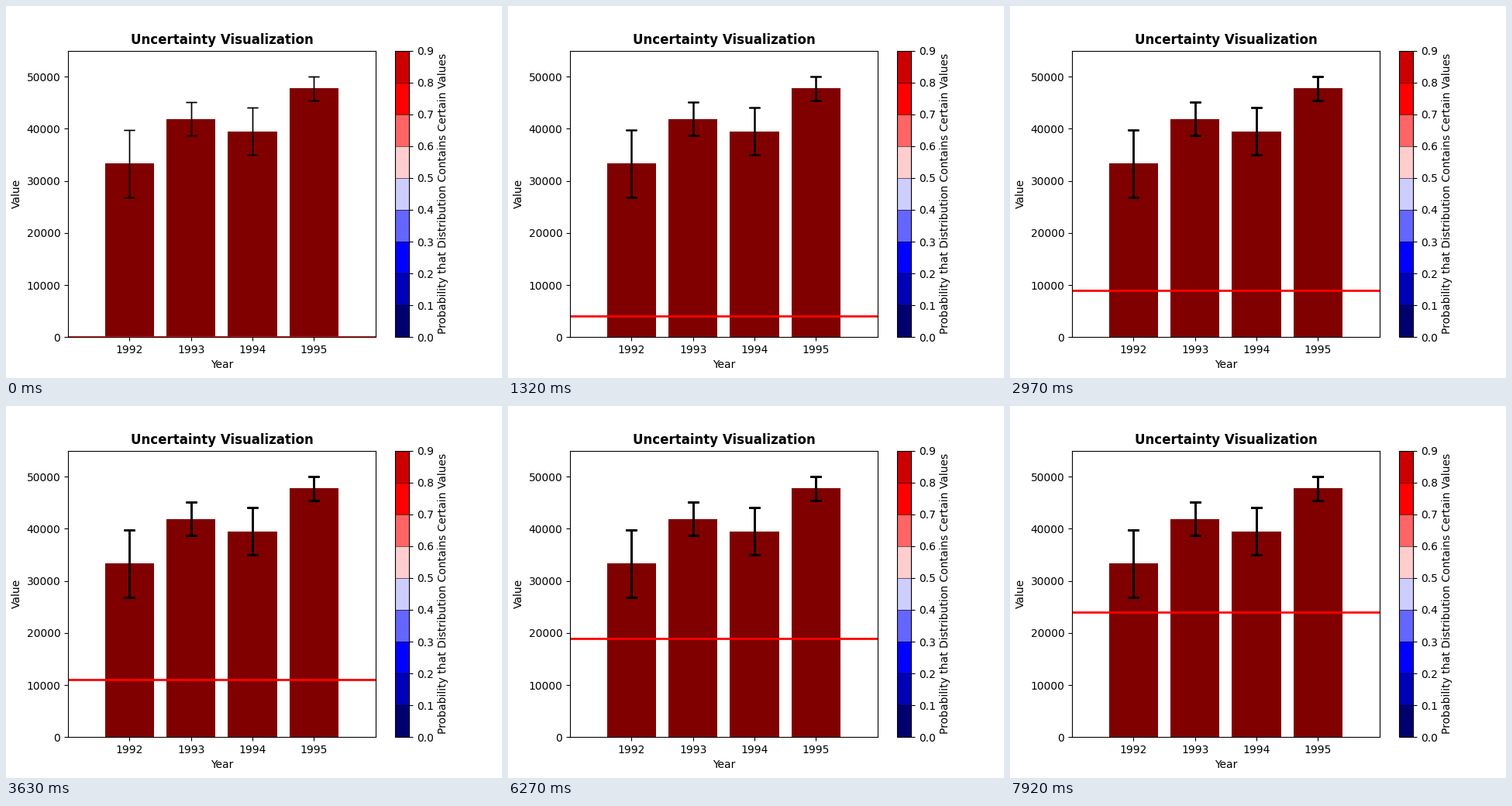
Animation, 640 px wide and 480 px high, one loop 8 s. Source, as a matplotlib script:

```python
import numpy as np
import matplotlib.pyplot as plt
from matplotlib.animation import FuncAnimation
from matplotlib.cm import ScalarMappable
from matplotlib.colors import BoundaryNorm, ListedColormap

LOOP_MS = 8000
TICK_MS = 40      # time between drawn frames
STEP_MS = 330     # time the threshold rests on each value
STEP_VALUE = 1000

years = ["1992", "1993", "1994", "1995"]
means = [33312, 41862, 39493, 47744]
errors = [6509, 3192, 4554, 2264]
seismic = plt.get_cmap("seismic")

plt.rcParams["font.family"] = "DejaVu Sans"
fig, ax = plt.subplots(figsize=(6.4, 4.8), dpi=100)

x = np.arange(len(years))
ax.bar(x, means, width=0.8, color=seismic(1.0))
_, caps, (stems,) = ax.errorbar(x, means, yerr=errors, fmt="none", ecolor="black",
                                elinewidth=1, capsize=5, capthick=1)
threshold = ax.axhline(0, color="red", linewidth=2)

ax.set_xlim(-1, 4)
ax.set_ylim(0, 55000)
ax.set_xticks(x, years)
ax.set_xlabel("Year")
ax.set_ylabel("Value")
ax.set_title("Uncertainty Visualization", fontweight="bold")

# Nine bands, each coloured by the probability at its middle
levels = np.arange(10) / 10
bands = ListedColormap(seismic(levels[:-1] + 0.05))
bar = fig.colorbar(ScalarMappable(BoundaryNorm(levels, bands.N), bands), ax=ax,
                   ticks=levels, drawedges=True)
bar.minorticks_off()
bar.set_label("Probability that Distribution Contains Certain Values")

segments = [np.array(s) for s in stems.get_segments()]
cap_points = [tuple(np.array(v, float) for v in cap.get_data()) for cap in caps]


def update(i):
    step = (i * TICK_MS + TICK_MS - 10) // STEP_MS
    threshold.set_ydata([step * STEP_VALUE] * 2)
    # Each step draws the error bars once more, which hardens their soft edges
    copies = step + 2
    stems.set_segments(segments * copies)
    for cap, (cx, cy) in zip(caps, cap_points):
        cap.set_data(np.tile(cx, copies), np.tile(cy, copies))
    return threshold, stems, *caps


anim = FuncAnimation(fig, update, frames=LOOP_MS // TICK_MS, interval=TICK_MS,
                     init_func=lambda: update(0), repeat=True, repeat_delay=0)
plt.show()
```
